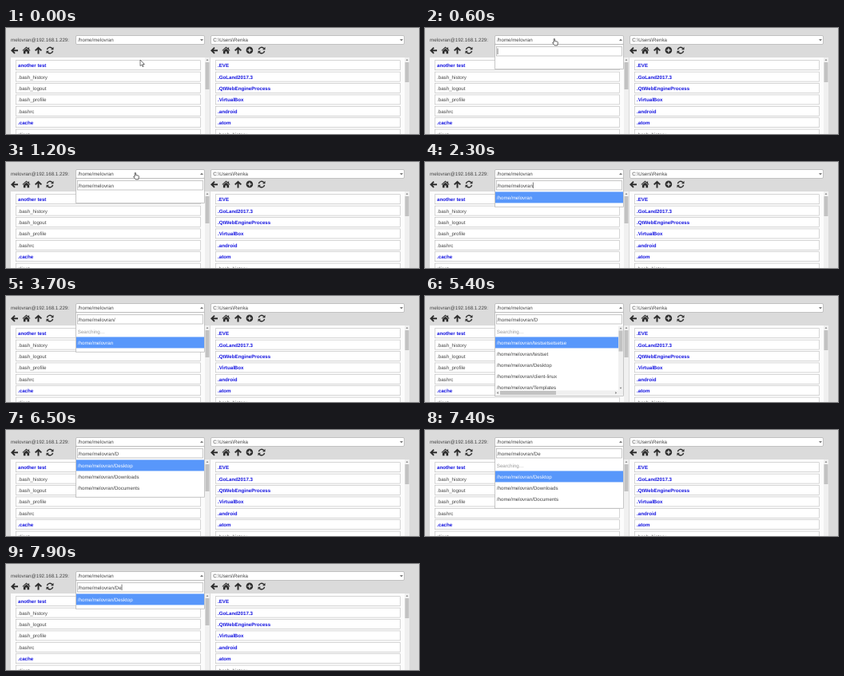
An HTML page for the animation above (8 s loop, 517 by 133 pixels).

```html
<!DOCTYPE html>
<html lang="en">
<head>
<meta charset="utf-8">
<title>Path picker</title>
<style>
  html, body { margin: 0; width: 100%; height: 100%; overflow: hidden; background: #dbdbdb; }
  svg { display: block; width: 517px; height: 133px; }
  text {
    font: 6.2px "Liberation Sans", Arial, sans-serif;
    fill: #444;
    text-rendering: geometricPrecision;
    white-space: pre;
  }
  .dir { font-weight: bold; fill: #1212e0; }
  .muted { fill: #999; }
  .picked { fill: #fff; }
  .panel { fill: #fcfcfc; }
  .box { fill: #fff; stroke: #aaa; stroke-width: .65; }
  .row { fill: #fff; stroke: #bbb; stroke-width: .6; }
  .highlight { fill: #5897fb; }
  .track { fill: #f0f0f0; }
  .thumb { fill: #c2c2c2; }
  .arrow { fill: #777; }
  .icon { fill: #2d2d2d; }
  .line { fill: none; stroke: #2d2d2d; stroke-width: 1.5; }
</style>
</head>
<body>
<svg viewBox="0 0 517 133">
  <defs>
    <path id="left" class="icon" d="M0 4.3 4.4 0 5.7 1.3 3.8 3.3H9V5.3H3.8L5.7 7.3 4.4 8.6Z"/>
    <path id="up" class="icon" d="M4.5 0 9 4.4 7.7 5.7 5.5 3.6V9H3.5V3.6L1.3 5.7 0 4.4Z"/>
    <path id="home" class="icon" d="M5 0 7.2 1.9V.8H8.6V3.1L10 4.4 9.4 5.1 5 1.4.6 5.1 0 4.4ZM5 2.2 8.6 5.2V8.6H6V5.9H4V8.6H1.4V5.2Z"/>
    <g id="refresh">
      <path class="line" d="M.9 3.7A3.7 3.7 0 0 1 7.3 2M8.1 5.3A3.7 3.7 0 0 1 1.7 7"/>
      <path class="icon" d="M9 .3V3.8H5.5ZM0 8.7V5.2H3.5Z"/>
    </g>
    <g id="plus">
      <circle class="icon" cx="4.4" cy="4.4" r="4.3"/>
      <path d="M4.4 1.9V6.9M1.9 4.4H6.9" stroke="#dbdbdb" stroke-width="1.4"/>
    </g>
  </defs>
  <g id="page"></g>
  <g id="popup"></g>
  <path id="arrowCursor" d="M0 0V7.6L1.8 6 3 8.6 4.2 8.1 3 5.5H5.4Z" fill="#fff" stroke="#222" stroke-width=".6"/>
  <path id="handCursor" d="M1.7 5.2V.8Q2.4-.2 3.1.8V3.4L6.3 4.2Q7 4.5 6.9 5.3L6.3 8.8H2.6L.2 5.6Q.2 4.5 1.7 5.2Z" fill="#fff" stroke="#222" stroke-width=".7"/>
</svg>
<script>
const LOOP = 8000;
const HOME = '/home/melovran';
const ROW = 14, LIST_TOP = 37, LIST_PAD = 4.7, MAX_HEIGHT = 88;
const $ = id => document.getElementById(id);

const text = (x, mid, str, cls = '') =>
  `<text x="${x}" y="${mid + 2.2}" class="${cls}">${str}</text>`;
const rect = (x, y, w, h, cls) =>
  `<rect x="${x}" y="${y}" width="${w}" height="${h}" class="${cls}"/>`;
const icon = (name, x, y) => `<use href="#${name}" x="${x}" y="${y}"/>`;
const tri = (x, y, dir, r = 2) =>
  `<path class="arrow" transform="translate(${x} ${y}) rotate(${dir})" d="M${-r} ${-r / 2}H${r}L0 ${r / 2 + .4}Z"/>`;

const select = (x, w, value) =>
  `<rect x="${x}" y="9.5" width="${w}" height="11" rx="1.5" class="box"/>` +
  text(x + 2.8, 15.2, value);

function fileList(x, names, plain, thumb) {
  const rows = names.map((name, i) => {
    const mid = 47 + i * 14.4;
    return rect(x + 6.5, mid - 6.3, 231, 12, 'row') +
      text(x + 9, mid, name, plain.includes(i) ? '' : 'dir');
  }).join('');
  return rect(x, 37, 243, 96, 'panel') + rows +
    rect(x + 243, 37, 6, 96, 'track') + rect(x + 243.5, 43, 5, thumb, 'thumb') +
    tri(x + 246, 40, 180, 1.4);
}

$('page').innerHTML =
  text(6, 15.2, 'melovran@192.168.1.229:') +
  select(87.5, 161, HOME) + select(256.5, 242, 'C:\\Users\\Renka') + tri(495, 15, 0) +
  [6, 256].map(x => icon('left', x, 24) + icon('home', x + 14.5, 23.6) + icon('up', x + 30, 23.4)).join('') +
  icon('refresh', 50.5, 23.5) + icon('plus', 300.5, 23.5) + icon('refresh', 315.5, 23.5) +
  fileList(6, ['another test', '.bash_history', '.bash_logout', '.bash_profile', '.bashrc', '.cache', 'client'],
    [1, 2, 3, 4, 6], 34) +
  fileList(256, ['.EVE', '.GoLand2017.3', '.QtWebEngineProcess', '.VirtualBox', '.android', '.atom', '.bash_history'],
    [6], 25);

// Each track lists [start, value]; a value holds until the next start.
const under = names => names.map(n => HOME + '/' + n);
const homeDirs = under(['testsetsetsetse', 'testset', 'Desktop', 'client-linux', 'Templates', 'Videos']);
const withD = under(['Desktop', 'Downloads', 'Documents']);
const tracks = {
  query: [[0, ''], [1200, HOME], [2800, HOME + '/'], [4900, HOME + '/D'], [6800, HOME + '/De']],
  items: [[0, []], [2300, [HOME]], [3900, homeDirs], [6000, withD], [7900, withD.slice(0, 1)]],
  note: [[0, 'Please enter 1 or more characters'], [1600, 'Searching…'], [2300, ''],
    [3700, 'Searching…'], [3900, ''], [5400, 'Searching…'], [6000, ''], [7400, 'Searching…'], [7900, '']],
  cursor: [[0, [168, 40]], [100, [167, 34]], [200, [165, 25]], [300, [159.5, 13]]]
};
const at = (track, t) => track.filter(([start]) => start <= t).pop()[1];

// The caret starts hidden and toggles at each of these times.
const caretFlips = [500, 1100, 1400, 1800, 2300, 2800, 2800, 3300, 3900, 4400, 4900,
  5400, 6000, 6500, 6800, 7400, 7900];
const caretOn = t => caretFlips.filter(f => f <= t).length % 2 === 1;

function popup(t) {
  if (t < 500) return tri(245, 15, 0);
  const items = at(tracks.items, t), note = at(tracks.note, t);
  const rows = (note ? [note] : []).concat(items);
  const full = rows.length * ROW + (items.length ? LIST_PAD : 0);
  const height = Math.min(full, MAX_HEIGHT);
  const scrolls = full > MAX_HEIGHT;
  const picked = note ? 1 : 0;
  let out = tri(245, 15, 180) + rect(87.5, 20.5, 161, LIST_TOP + height - 20, 'box') +
    rect(89.5, 23.5, 157, 11.5, 'box') + text(90.6, 29.3, at(tracks.query, t), 'query');
  rows.forEach((row, i) => {
    const y = LIST_TOP + i * ROW + .4;
    if (y + ROW > LIST_TOP + height) return;
    if (i === picked) out += rect(88, y, 160, ROW, 'highlight');
    const cls = i === picked ? 'picked' : row === 'Searching…' ? 'muted' : '';
    out += text(89.8, y + 7, row, cls);
  });
  if (scrolls) {
    out += rect(242, 37.5, 6, 81, 'track') + rect(242.5, 43.5, 5, 26, 'thumb') +
      tri(245, 40.5, 180, 1.4) + tri(245, 115.5, 0, 1.4) +
      rect(88, 118.5, 160, 6, 'track') + rect(94, 119, 70, 5, 'thumb') +
      tri(91, 121.5, 90, 1.4) + tri(239, 121.5, -90, 1.4);
  }
  return out;
}

function addCaret() {
  const x = 91 + $('popup').querySelector('.query').getComputedTextLength();
  $('popup').insertAdjacentHTML('beforeend', `<path d="M${x} 25.5V33" stroke="#222" stroke-width=".6"/>`);
}

function moveCursor(t) {
  const [x, y] = at(tracks.cursor, t);
  const hand = t >= 300;
  for (const [id, shown] of [['arrowCursor', !hand], ['handCursor', hand && t < 1600]]) {
    $(id).setAttribute('transform', `translate(${x} ${y})`);
    $(id).style.display = shown ? '' : 'none';
  }
}

let last = -1;
function draw() {
  const t = Math.floor(performance.now() % LOOP / 100) * 100;
  if (t !== last) {
    last = t;
    $('popup').innerHTML = popup(t);
    if (caretOn(t)) addCaret();
    moveCursor(t);
  }
  requestAnimationFrame(draw);
}
draw();
</script>
</body>
</html>
```
